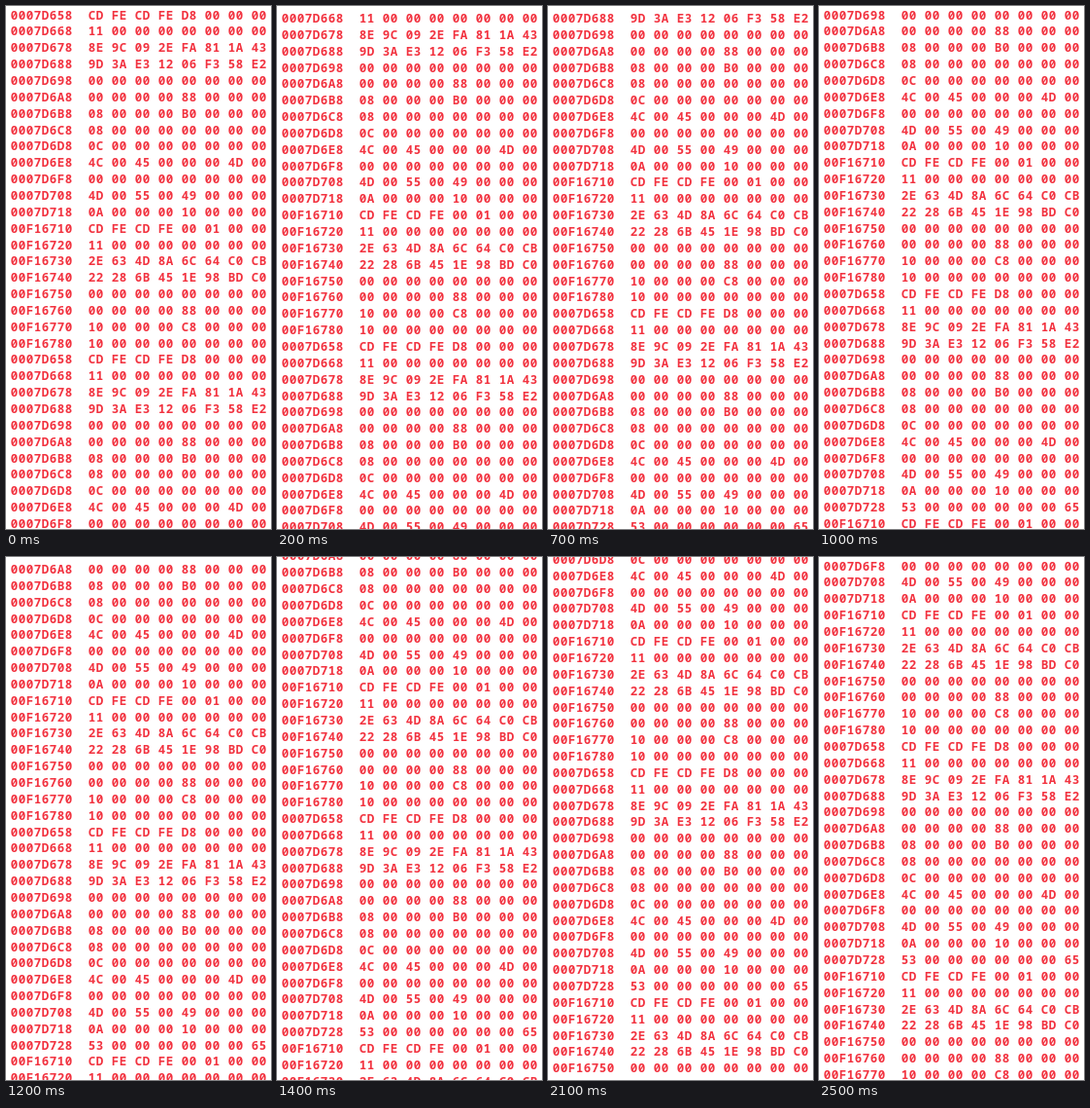
An HTML page for the animation above (2600 ms loop, 273 by 537 pixels).

```html
<!DOCTYPE html>
<html lang="en">
<head>
<meta charset="utf-8">
<title>Scrolling hex dump</title>
<style>
html, body { margin: 0; width: 100%; height: 100%; overflow: hidden; background: #fff; }
svg { display: block; width: 100%; height: 100%; }
text {
  font: 600 12.5px "Noto Sans Mono", "DejaVu Sans Mono", monospace;
  letter-spacing: 0.5px;
  fill: #f23340;
  white-space: pre;
}
</style>
</head>
<body>
<svg viewBox="0 0 273 537"><g id="dump"></g></svg>
<script>
const LOOP = 2600, TICK = 100;
const PITCH = 16.85, STEP = PITCH * 0.4;
const LEFT = 4.8, BASELINE = 13.6;

const low = [
  "CD FE CD FE D8",
  "11",
  "8E 9C 09 2E FA 81 1A 43",
  "9D 3A E3 12 06 F3 58 E2",
  "",
  "00 00 00 00 88",
  "08 00 00 00 B0",
  "08",
  "0C",
  "4C 00 45 00 00 00 4D",
  "",
  "4D 00 55 00 49",
  "0A 00 00 00 10",
  "53 00 00 00 00 00 00 65"
];
const high = [
  "CD FE CD FE 00 01",
  "11",
  "2E 63 4D 8A 6C 64 C0 CB",
  "22 28 6B 45 1E 98 BD C0",
  "",
  "00 00 00 00 88",
  "10 00 00 00 C8",
  "10"
];

// Prefix each row with its address and pad it to eight bytes with zeros.
function block(start, rows) {
  return rows.map((row, i) => {
    const address = (start + i * 16).toString(16).toUpperCase().padStart(8, "0");
    const bytes = row ? row.split(" ") : [];
    while (bytes.length < 8) bytes.push("00");
    return address + "  " + bytes.join(" ");
  });
}

const lowRows = block(0x7D658, low);
const highRows = block(0xF16710, high);
const lines = [...lowRows.slice(0, 13), ...highRows, ...lowRows, ...highRows];

const dump = document.getElementById("dump");
lines.forEach((line, i) => {
  const text = document.createElementNS("http://www.w3.org/2000/svg", "text");
  text.setAttribute("x", LEFT);
  text.setAttribute("y", BASELINE + i * PITCH);
  text.textContent = line;
  dump.append(text);
});

function draw(time) {
  const tick = Math.floor((time % LOOP) / TICK);
  dump.setAttribute("transform", `translate(0 ${-tick * STEP})`);
}

const start = performance.now();
function frame() {
  draw(performance.now() - start);
  requestAnimationFrame(frame);
}
frame();
</script>
</body>
</html>
```
